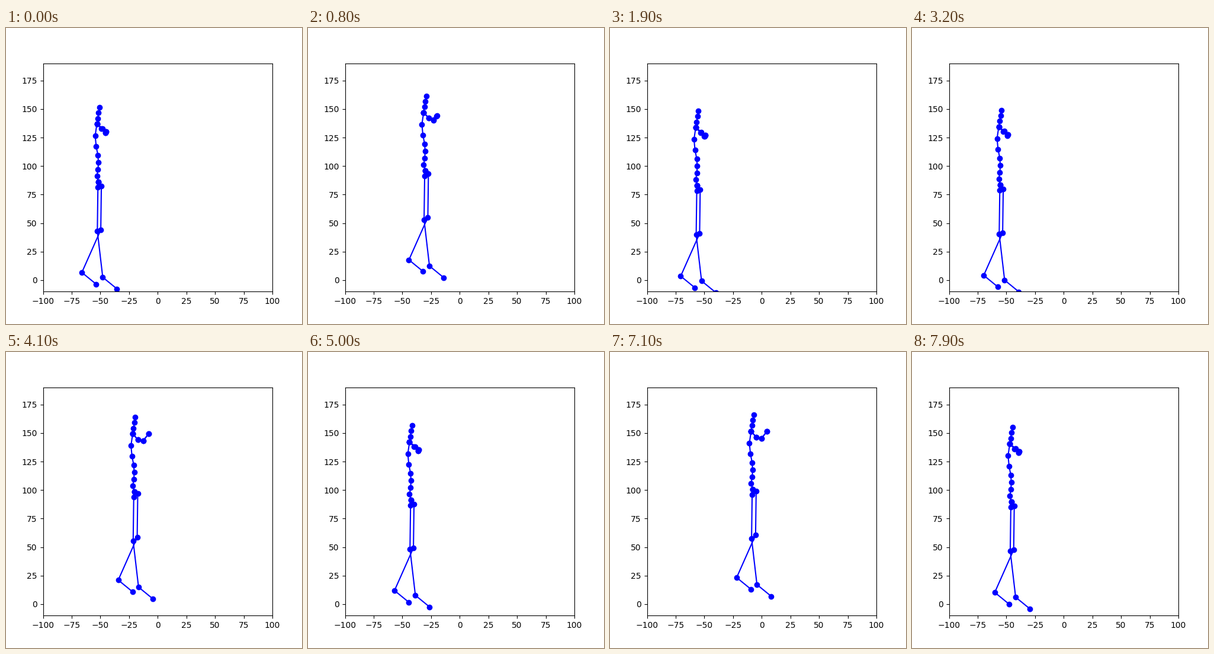
A matplotlib script for the animation above (8 s loop, 500 px wide and 500 px high).

```python
import numpy as np
import matplotlib.pyplot as plt
from matplotlib.animation import FuncAnimation

FRAMES, INTERVAL = 80, 100

# Joints at rest, in data units
NECK = np.array([-53.1, 137.0])
HEAD = np.linspace((-50.8, 151.6), NECK, 4)
BACK = np.array([NECK, (-54.6, 126.6), (-53.7, 117.2), (-52.2, 109.5), (-51.8, 103.2),
                 (-52.1, 97.0), (-53.1, 91.3), (-51.8, 86.2)])
PELVIS = BACK[-1]
THIGH, FOOT = (-0.5, -38.5), (12.4, -10.2)

# Shoulder, elbow and hand, relative to the neck
ARMS_DOWN = np.array([[(4.1, -4.4), (7.4, -7.8), (8.2, -6.9)],
                      [(5.0, -4.0), (8.2, -6.9), (7.6, -7.6)]])
ARM_UP = np.array([(4.5, -5.2), (9.1, -6.2), (14.0, 0.1)])


def smoothstep(v, lo, hi):
    u = np.clip((v - lo) / (hi - lo), 0, 1)
    return u * u * (3 - 2 * u)


def bump(t, height, center, width):
    return height * np.exp(-(t - center) ** 2 / (2 * width ** 2))


def drift(t):
    """Sideways offset: slow level, small ripple and three forward lunges."""
    level = np.interp(t, (0, 16, 31, 46, 79), (-1.6, -3.8, -3.8, 6.1, 6.7))
    ripple = np.interp(t, (31, 46), (1.7, 2.5)) * np.cos(2 * np.pi * (t - 24.5) / 12.5)
    lunges = bump(t, 42.8, 11, 2.9) + bump(t, 29.5, 40.8, 3.4) + bump(t, 37.8, 70.9, 3)
    return level + ripple + lunges


def leg(hip, shin):
    return np.cumsum([PELVIS, hip, THIGH, shin, FOOT], axis=0)


def pose(t):
    dx = drift(t)
    shift = np.array([dx, 18.5 * (1 - np.exp(-dx / 28))])
    lift = smoothstep(dx, 9, 32)
    chains = [
        HEAD,
        BACK,
        leg((-0.4, -4.8), (4.7, -40.5)),
        leg((2.6 + 0.5 * lift, -3.7 + 2 * lift), (-16.5, -37.4)),
    ]
    for down in ARMS_DOWN:
        arm = down + lift * (ARM_UP - down)
        chains.append(np.vstack([NECK, NECK + arm]))
    return [chain + shift for chain in chains]


fig, ax = plt.subplots(figsize=(5, 5), dpi=100)
ax.set(xlim=(-100, 100), ylim=(-10, 190),
       xticks=range(-100, 101, 25), yticks=range(0, 176, 25))
lines = [ax.plot([], [], "bo-")[0] for _ in pose(0)]


def update(t):
    for line, chain in zip(lines, pose(t)):
        line.set_data(*chain.T)
    return lines


anim = FuncAnimation(fig, update, frames=FRAMES, interval=INTERVAL,
                     repeat=True, repeat_delay=0)
plt.show()
```
